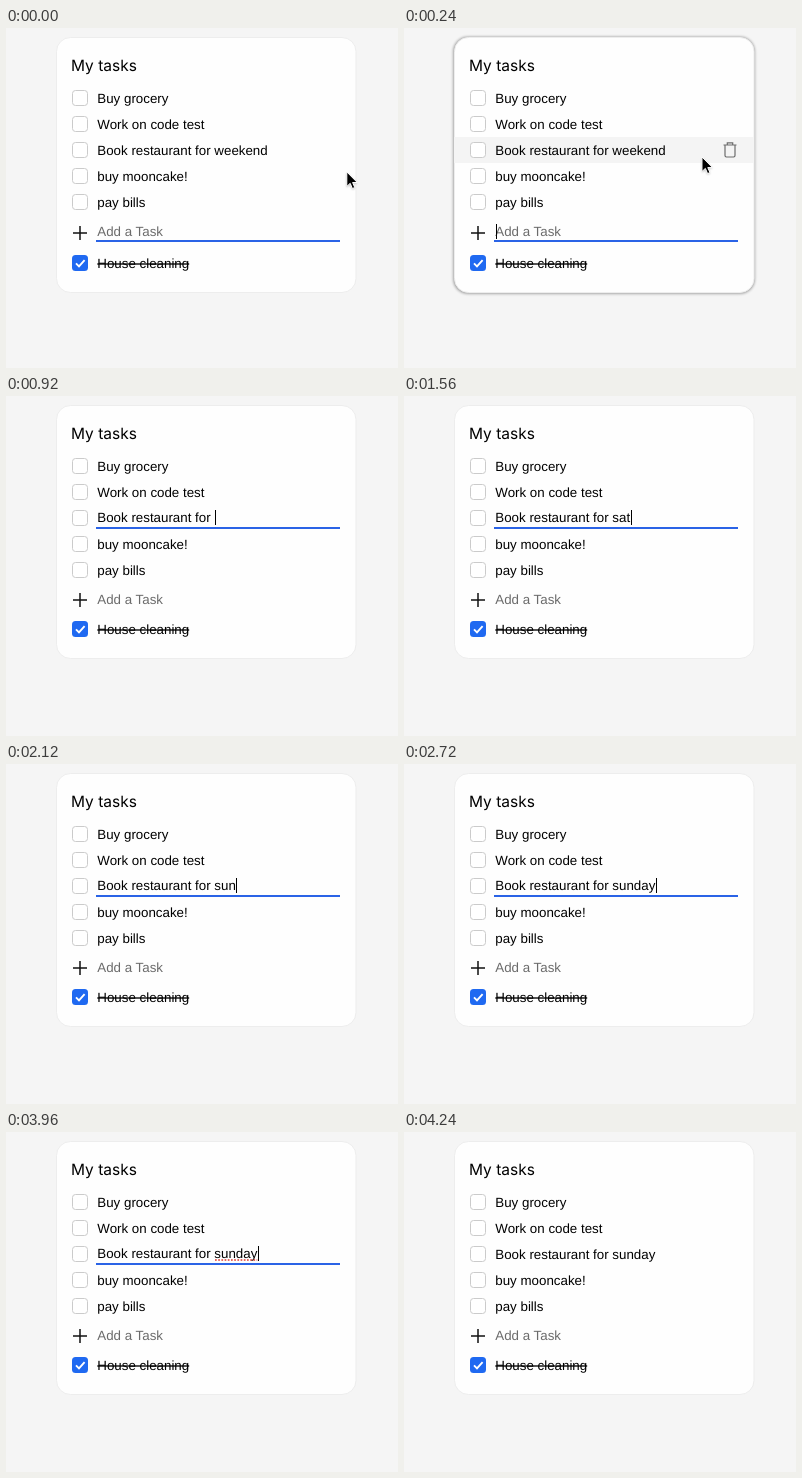
Write an HTML page that moves like this. It is 392x340 px and loops after 4.36 s.

```html
<!DOCTYPE html>
<html lang="en">
<head>
<meta charset="utf-8">
<title>My tasks</title>
<style>
  html, body { margin: 0; width: 100%; height: 100%; overflow: hidden; background: #f5f5f5; }
  svg { display: block; width: 392px; height: 340px; }
  text { font: 13.333px "Liberation Sans", Arial, sans-serif; fill: #000; white-space: pre; text-rendering: geometricPrecision; }
  .title { font: 15.5px Inter, sans-serif; }
  .hint { fill: #6b6b6b; }
  .done { text-decoration: line-through; }
  .box { fill: #fff; stroke: #cbcbcb; }
</style>
</head>
<body>
<svg viewBox="0 0 392 340">
  <defs>
    <filter id="blur" x="-10%" y="-10%" width="120%" height="120%"><feGaussianBlur stdDeviation="1.4"/></filter>
    <filter id="soft" x="-50%" y="-50%" width="200%" height="200%"><feGaussianBlur stdDeviation="1"/></filter>
  </defs>
  <rect width="392" height="340" fill="#f5f5f5"/>
  <rect id="shadow" x="49.5" y="9" width="301" rx="14.5" fill="#000" filter="url(#blur)"/>
  <rect id="card" x="50.5" y="9.5" width="299.5" rx="14" fill="#fefefe" stroke="#ededed"/>
  <rect id="hover" x="50" width="300" height="26" fill="#f4f4f4"/>
  <text class="title" x="65" y="43">My tasks</text>
  <g id="rows"></g>
  <path id="spell" stroke="#e0392f" stroke-width="1.7" stroke-dasharray="1.7 1.5"/>
  <g id="plus"><path d="M67 0H81M74 -7V7" stroke="#111" stroke-width="1.5"/></g>
  <text class="hint" x="91.3" y="208">Add a Task</text>
  <rect id="line" x="90" height="2" fill="#2a63e6"/>
  <rect id="caret" width="1" height="15" fill="#000"/>
  <g id="done">
    <rect x="66" y="-8" width="16" height="16" rx="3.5" fill="#1f69f1"/>
    <path d="M70 .3L73 3.4L78.6 -2.8" fill="none" stroke="#fff" stroke-width="1.9"/>
    <text class="done" x="91.3" y="5">House cleaning</text>
  </g>
  <g id="trash" fill="none" stroke="#6c6c6c" stroke-width="1.2">
    <path d="M319.5 -5H332.5M323.3 -5V-7.2H328.7V-5M321 -5V5.6Q321 7 322.4 7H329.6Q331 7 331 5.6V-5"/>
  </g>
  <g id="pointer">
    <path d="M0 1V15.5L3.4 12.4L5.6 17.6L8 16.6L5.8 11.6H10.5Z" fill="#000" opacity=".3" filter="url(#soft)"/>
    <path d="M0 0V14.5L3.4 11.4L5.6 16.6L8 15.6L5.8 10.6H10.5Z" stroke="#fff" stroke-width="1"/>
  </g>
</svg>
<script>
const LOOP = 4360, CLICK = 440, LEAVE = 560, SPELL = 2760, COMMIT = 4040, BLINK = 200;
const LEFT = 91.3, STEM = "Book restaurant for ";
const $ = id => document.getElementById(id);
const clamp = v => Math.max(0, Math.min(1, v));
const mix = (a, b, k) => a + (b - a) * k;
const rowY = i => 70 + 26 * i;
const set = (el, attrs) => { for (const k in attrs) el.setAttribute(k, attrs[k]); };
const show = (el, on) => el.setAttribute("visibility", on ? "visible" : "hidden");

const tasks = ["Buy grocery", "Work on code test", STEM + "weekend", "buy mooncake!", "pay bills"];
$("rows").innerHTML = tasks.map((task, i) =>
  `<rect class="box" x="66.5" y="${rowY(i) - 7.5}" width="15" height="15" rx="3"/>` +
  `<text x="${LEFT}" y="${rowY(i) + 5}">${task}</text>`).join("");
const edited = $("rows").querySelectorAll("text")[2];

// Keystrokes: [time, word after the stem]
const keys = [[CLICK, "weekend"]];
for (let i = 0; i < 7; i++) keys.push([600 + 40 * i, "weekend".slice(0, 6 - i)]);
keys.push([1440, "s"], [1520, "sa"], [1560, "sat"], [2000, "sa"], [2040, "s"],
  [2080, "su"], [2120, "sun"], [2200, "sund"], [2240, "sunda"], [2320, "sunday"]);

function pointerAt(t) {
  if (t < LEAVE) {
    const k = 1 - Math.pow(1 - clamp(t / CLICK), 1.33);
    return [mix(341, 275, k), mix(144, 121, k)];
  }
  const k = Math.pow(clamp((t - LEAVE) / 240), 1.4);
  return [mix(275, 400, k), mix(121, 116, k)];
}

function draw(t) {
  const editing = t >= CLICK && t < COMMIT;
  const adding = t < CLICK;
  const [px, py] = pointerAt(t);
  const inside = t >= 40 && px < 350;
  const row = Math.round((py - 70) / 26);
  const drop = adding ? 2 : 0;

  set($("pointer"), { transform: `translate(${px} ${py})` });
  show($("pointer"), px < 392);

  set($("card"), { height: 253 + drop });
  set($("shadow"), { height: 254.5 + drop,
    opacity: 0.42 * clamp((t - 20) / 140) * clamp((900 - t) / 150) });
  set($("hover"), { y: rowY(row) - 13 });
  set($("trash"), { transform: `translate(0 ${rowY(row)})` });
  show($("hover"), inside);
  show($("trash"), inside);
  set($("plus"), { transform: `translate(0 ${adding ? 205 : 204})` });
  set($("done"), { transform: `translate(0 ${233 + drop})` });

  let last = keys[0];
  for (const key of keys) if (t >= key[0]) last = key;
  const label = STEM + last[1];
  if (edited.textContent !== label) edited.textContent = label;
  set(edited, { y: editing ? 126 : 127 });

  set($("line"), { y: adding ? 212 : 131, width: editing && inside ? 228 : 244 });
  show($("line"), adding || editing);

  const end = LEFT + edited.getComputedTextLength();
  set($("caret"), { x: adding ? 92 : Math.ceil(end), y: adding ? 196 : 114 });
  const lit = adding ? t >= 160 && t < 360 : Math.floor((t - last[0]) / BLINK) % 2 === 0;
  show($("caret"), lit && (adding || editing));

  set($("spell"), { d: `M209 128H${end}` });
  show($("spell"), t >= SPELL && editing);
}

const start = performance.now();
function tick() {
  draw((performance.now() - start) % LOOP);
  requestAnimationFrame(tick);
}
tick();
</script>
</body>
</html>
```
